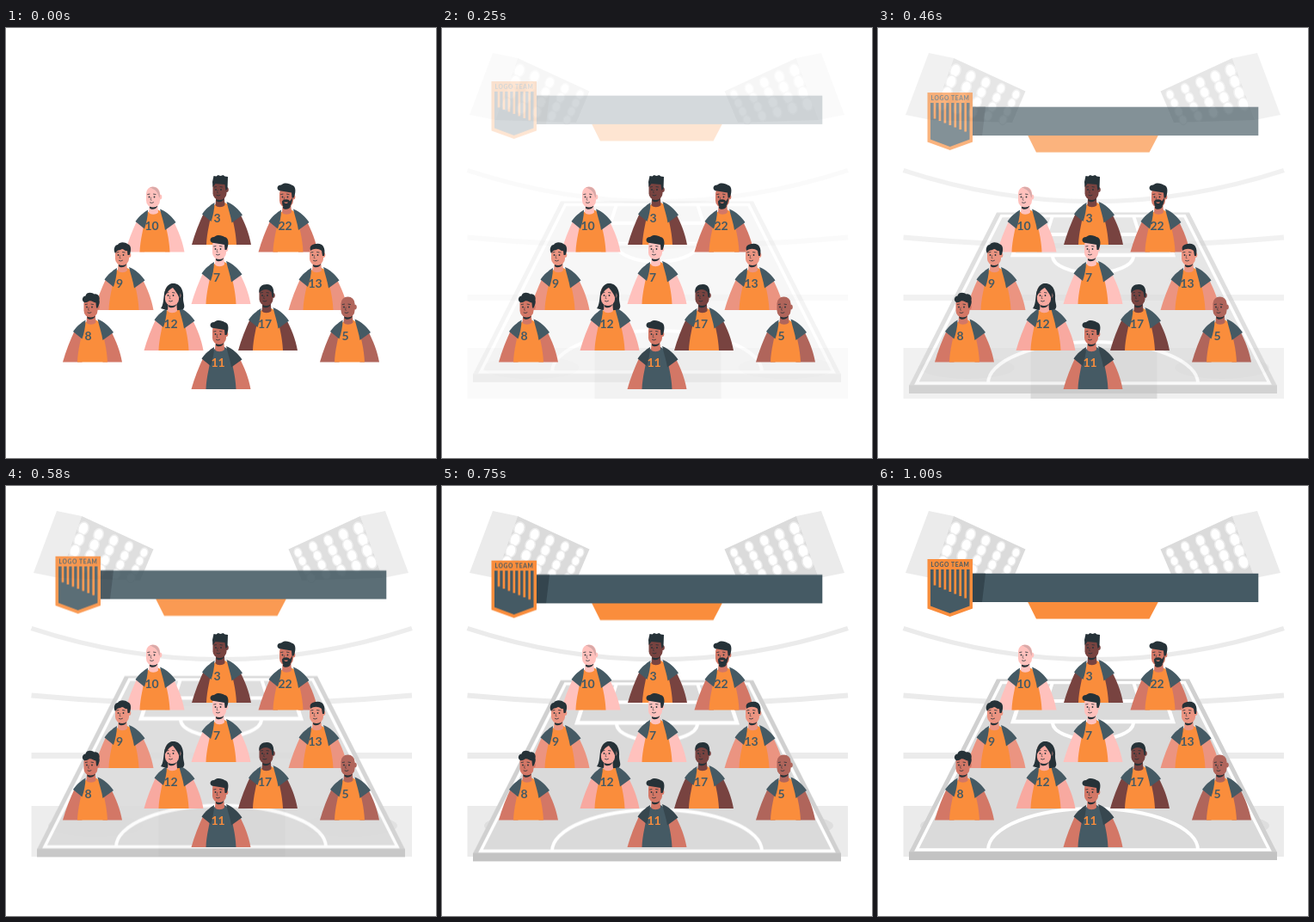
Write an HTML page that moves like this. It is 500x500 px and loops after 1040 ms.

```html
<!DOCTYPE html>
<html lang="en">
<head>
<meta charset="utf-8">
<title>Team line-up</title>
<style>
  html, body { margin: 0; width: 100%; height: 100%; overflow: hidden; background: #fff; }
  svg { display: block; width: 100%; height: 100%; }
  .stadium, .drop { animation: fade 1040ms infinite; }
  .drop { animation-name: drop; }
  @keyframes fade {
    0% { opacity: 0; animation-timing-function: cubic-bezier(.36, -.01, .5, 1.38); }
    96.154%, 100% { opacity: 1; }
  }
  @keyframes drop {
    0% { opacity: 0; transform: translateY(-30px); animation-timing-function: cubic-bezier(.36, -.01, .5, 1.38); }
    96.154%, 100% { opacity: 1; transform: translateY(0); }
  }
  text { font-family: Lato, "Open Sans", sans-serif; font-weight: 700; text-anchor: middle; }
  .num { font-size: 14px; }
  .lines { fill: none; stroke: #fff; stroke-width: 4; }
</style>
</head>
<body>
<svg viewBox="0 0 500 500">
  <g class="stadium">
    <g fill="none" stroke="#ebebeb" stroke-width="5.5">
      <path d="M29.500 165.500Q250 238 472 165.500"/>
      <path d="M29.500 243.500Q250 264 472 243.500" stroke-width="6"/>
      <path d="M29.500 313.500H472" stroke-width="7"/>
    </g>
    <path d="M29.500 372H472V431H29.500Z" fill="#ebebeb"/>
    <path d="M177.500 372H324.500V431H177.500Z" fill="#c9c9c9"/>
    <g fill="#dedede">
      <ellipse cx="104" cy="395" rx="55" ry="13"/>
      <ellipse cx="400" cy="395" rx="55" ry="13"/>
    </g>
    <g id="lamp">
      <path d="M59 29L88 35L62 107L32 101Z" fill="#ebebeb"/>
      <path d="M88 35L171.500 73.500L156 110L62 107Z" fill="#dbdbdb"/>
      <g id="bulbs"></g>
    </g>
    <use href="#lamp" transform="matrix(-1 0 0 1 500 0)"/>
  </g>

  <g class="drop">
    <path d="M138 224.500H362L464 426H36Z" fill="#d0d0d0"/>
    <path d="M36 425.500H464V435H36Z" fill="#c3c3c3"/>
    <path d="M143.500 228H356.500L456 423.500H44Z" fill="#dadada"/>
    <g class="lines">
      <path d="M143.500 228.500H356.500L455 423H45Z" stroke-width="3.500"/>
      <path d="M172 228L157 274H343L328 228" stroke-width="4.500"/>
      <path d="M203 228L196 250H304L297 228"/>
      <path d="M203 275A47 20 0 0 0 297 275"/>
      <path d="M128 423A122 48 0 0 1 372 423"/>
    </g>

    <path d="M174 134.500H326L315.500 154.500H184Z" fill="#fa8d3c"/>
    <path d="M109 101.700H442.300V135H109Z" fill="#455a64"/>
    <path d="M109 101.700H125L121 135H109Z" fill="#34454e"/>

    <path d="M57.500 85H110V142.500L83.700 152L57.500 142.500Z" fill="#fa8d3c"/>
    <path d="M61 97H106.500V139.500L83.700 148L61 139.500Z" fill="#455a64"/>
    <g id="stripes" stroke="#fa8d3c" stroke-width="2.700"></g>
    <text x="84" y="94" font-size="6.700" letter-spacing=".65" fill="#455a64">LOGO TEAM</text>
  </g>

  <g id="team"></g>
</svg>

<script>
  const INK = '#263238', SLATE = '#455a64', ORANGE = '#fa8d3c';
  const add = (id, html) => document.getElementById(id).innerHTML = html;
  const path = (d, fill) => `<path d="${d}" fill="${fill}"/>`;
  const line = (d, width) =>
    `<path d="${d}" fill="none" stroke="${INK}" stroke-width="${width}" stroke-linecap="round"/>`;

  // Lamp bulbs: a slanted grid, smaller towards the far side
  let bulbs = '';
  for (let row = 0; row < 4; row++) {
    for (let col = 0; col < 5; col++) {
      const x = 90 + col * 17.6 - row * 5;
      const y = 49.5 + col * 7 + row * (13 - col * .8);
      const r = 7.8 - col * .5;
      bulbs += `<g transform="translate(${x} ${y}) rotate(18)">
        <ellipse rx="${r * .86}" ry="${r + .6}" fill="#ececec"/>
        <ellipse rx="${r * .66}" ry="${r - 1}" fill="#fff"/></g>`;
    }
  }
  add('bulbs', bulbs);

  let stripes = '';
  for (let i = 0; i < 7; i++) {
    const x = 66 + i * 5.95;
    stripes += `<path d="M${x} 96.500V${115.5 + i * 2.5}"/>`;
  }
  add('stripes', stripes);

  // Hair outlines around a head centred on 0,0
  const hair = {
    flat: 'M-8 -3L-8.500 -9L-7 -16L-4 -15.500L-2 -17L1 -16L4 -17L6 -15.500L9.500 -15L9 -1L7 1L6 -6L-5 -7Z',
    quiff: 'M-6 -7C-12 -7 -12 -14 -6 -14C-3 -17.500 4 -16 6 -14C12 -13 11 -4 8.500 1L6.500 1L6 -5C2 -6 -2 -6 -6 -7Z',
    waves: 'M-8 -2C-11 -7 -8 -12 -5 -12C-3 -16 4 -15 6 -13C11 -12 11 -5 8.500 0L6.500 0L6 -5C3 -4 2 -7 0 -7C-3 -5 -5 -7 -8 -2Z',
    curly: 'M-7 -5C-12 -8 -9 -13 -6 -13C-5 -18 2 -17 4 -15C9 -16 11 -11 10 -8C11 -5 9 -1 8 1L6.500 1L6 -5C3 -5 1 -8 -2 -7C-4 -5 -6 -6 -7 -5Z',
    short: 'M-7 -5C-9 -11 -4 -13 0 -13C7 -14 11 -9 9 1L7 1L6 -5C2 -8 -3 -8 -7 -5Z',
    buzz: 'M-8 -3C-9 -10 -5 -13 1 -13C7 -13 10 -8 8.500 2L7 2L6 -4C2 -8 -4 -8 -8 -3Z',
    fringe: 'M-9 3C-9 -10 -4 -13 1 -13.500C9 -13 11 -4 9 6C8 -1 4 -5 1 -9C-3 -7 -6 -4 -9 3Z',
    shaved: 'M-4 -11C2 -14 9 -9 8 0L7 1C6 -5 3 -9 -4 -11Z'
  };
  const longBack = 'M0 -14C11 -15 14 -4 13 4C13 9 16 13 13 16C7 18 -6 18 -13 15C-10 11 -10 5 -9 -2C-8 -8 -5 -13 0 -14Z';
  const beard = 'M-5 5C-3 2 3 2 4 5L7 1C7 8 4 13 0 13C-4 13 -5 9 -5 5ZM-3 6C-1 8 1 8 2 6Z';

  function face(p) {
    const back = p.hair === 'fringe' ? path(longBack, INK) : '';
    return `${back}
      ${path('M-4 5H5L6 18C3 21 -3 21 -5 18Z', p.skin)}
      ${path('M-4 9C0 12 4 11 5 8L5 11C3 15 -2 15 -4 13Z', INK)}
      <ellipse cx="8" cy="0" rx="2.300" ry="3" fill="${p.skin}"/>
      <rect x="-8" y="-12" width="16" height="24" rx="7.800" fill="${p.skin}"/>
      ${p.hair ? path(hair[p.hair], p.tint || INK) : ''}
      ${p.beard ? path(beard, INK) : ''}
      <circle cx="-4.500" cy="0" r=".9" fill="${INK}"/>
      <circle cx="1.500" cy="0" r=".9" fill="${INK}"/>
      ${line('M-6.300 -3L-4 -3.400M.500 -3.400L3 -3', .8)}
      ${line('M-2.300 .5L-3 3.500L-1.800 3.700', .5)}
      ${p.beard ? '' : line('M-3.500 6.500Q-1.500 7.800 .500 6.300', .8)}`;
  }

  function player(p) {
    const shirt = p.dark ? SLATE : ORANGE;
    const sleeve = p.dark ? '#37474f' : SLATE;
    const numX = p.n < 10 ? -5 : -3.5;
    return `<g transform="translate(${p.x} ${p.y})">
      ${path('M-34.500 0C-31 -13 -26 -25 -20 -38L-9 -30L-12 0Z', p.skin)}
      ${path('M34.500 0C32 -13 28 -24 21 -37L9 -30L12 0Z', p.skin)}
      ${path('M-17.500 0C-17 -14 -13 -28 -10 -45L-4 -49H4L9 -46C13 -30 17 -15 17.500 0Z', shirt)}
      ${path('M-8 -49C-13 -46 -19 -41 -22.500 -35.500L-12 -27C-10 -33 -8 -41 -8 -49Z', sleeve)}
      ${path('M6 -50C14 -47 20 -41 24.500 -34.500L12 -25.500C11 -33 8 -41 6 -50Z', sleeve)}
      <g transform="translate(-2 -64)">${face(p)}</g>
      <text class="num" x="${numX}" y="-26" fill="${p.dark ? ORANGE : SLATE}">${p.n}</text>
    </g>`;
  }

  const pale = '#ffc1bd', rose = '#f8a9a0', peach = '#eb9481', tan = '#d37766', brown = '#b0655b', deep = '#784340';
  const team = [
    { n: 10, x: 173, y: 260.5, skin: pale, hair: 'shaved', tint: '#d8a9a8' },
    { n: 3, x: 250.5, y: 252, skin: deep, hair: 'flat' },
    { n: 22, x: 328, y: 260.5, skin: tan, hair: 'quiff', beard: true },
    { n: 9, x: 137, y: 328, skin: peach, hair: 'waves' },
    { n: 7, x: 250, y: 321, skin: pale, hair: 'quiff' },
    { n: 13, x: 363, y: 328, skin: peach, hair: 'short' },
    { n: 12, x: 195, y: 375, skin: rose, hair: 'fringe' },
    { n: 17, x: 304.5, y: 375, skin: deep, hair: 'buzz' },
    { n: 8, x: 100.5, y: 388.5, skin: tan, hair: 'curly' },
    { n: 5, x: 399.5, y: 388.5, skin: brown },
    { n: 11, x: 250, y: 420, skin: tan, hair: 'quiff', dark: true }
  ];
  add('team', team.map(player).join(''));
</script>
</body>
</html>
```
